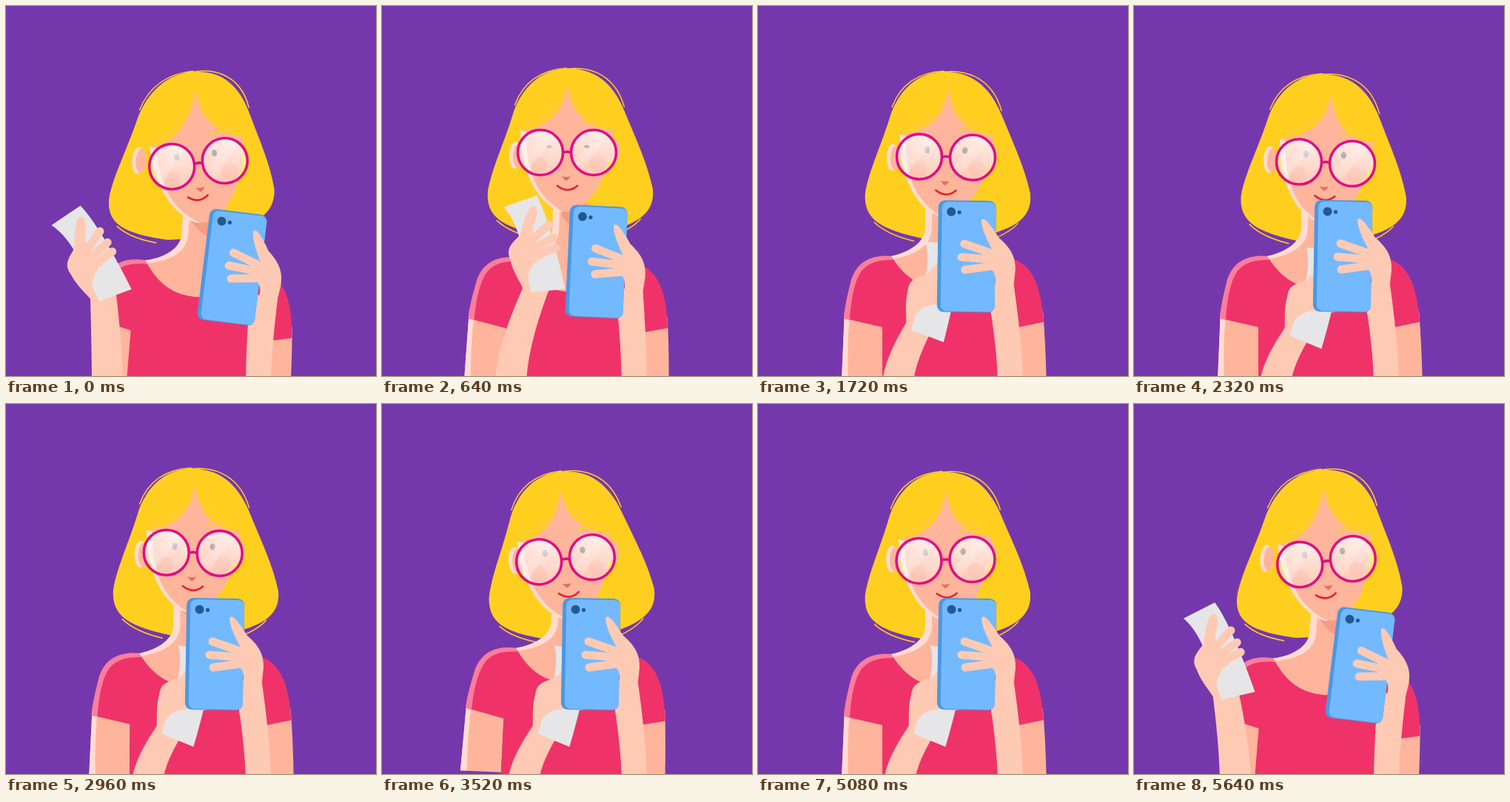
These frames come from a looping animation (500 px wide and 500 px high, 5.68 s). An HTML page:

```html
<!DOCTYPE html>
<html lang="en">
<head>
<meta charset="utf-8">
<title>Woman with phone and paper</title>
<style>
  html, body { margin: 0; width: 100%; height: 100%; overflow: hidden; background: #7538ac; }
  svg { display: block; width: 100%; height: 100%; }
  .skin { fill: #ffb59c; }
  .hand { fill: #ffcab3; }
  .light { fill: #ffdcd2; }
  .pink { fill: #ef3369; }
  .yellow { fill: #ffcf20; }
  .strand { fill: none; stroke: #ffcf20; stroke-width: 1.5; stroke-linecap: round; }
  .part { fill: none; stroke: #ffc09a; stroke-width: 1; stroke-linecap: round; }
  .finger { fill: none; stroke: #ffcab3; stroke-width: 11; stroke-linecap: round; }
  .ring { fill: none; stroke: #e00e82; stroke-width: 3.6; }
  .blush { fill: #f08f78; fill-opacity: .35; }
</style>
</head>
<body>
<svg viewBox="0 0 500 500">
  <defs>
    <linearGradient id="glass" x1=".6" y1="0" x2=".4" y2="1">
      <stop offset="0" stop-color="#fff" stop-opacity=".76"/>
      <stop offset="1" stop-color="#fff" stop-opacity=".26"/>
    </linearGradient>
    <clipPath id="lens"><circle r="30.5"/></clipPath>
    <g id="lensShape">
      <circle r="30.5" fill="url(#glass)"/>
      <path clip-path="url(#lens)" fill="#fff" fill-opacity=".18" d="M-34 20L14-34H30L-22 30Z"/>
      <circle r="30.5" class="ring"/>
    </g>
  </defs>
  <rect width="500" height="500" fill="#7538ac"/>

  <g id="hair">
    <path class="yellow" d="M250 86C220 86 193 102 178 142C165 188 150 218 145 250C143 285 165 300 228 312H285C345 300 372 285 368 250C360 215 345 185 330 150C314 110 290 86 250 86Z"/>
    <path class="strand" d="M179 134C190 103 214 87 248 85M238 88C272 80 312 90 327 138M158 290C172 303 190 310 212 315M352 290C344 300 332 306 318 312"/>
    <ellipse class="light" cx="181" cy="202" rx="8" ry="18"/>
    <ellipse class="skin" cx="185" cy="203" rx="7" ry="16"/>
    <ellipse class="skin" cx="315" cy="198" rx="7" ry="16"/>
  </g>

  <g id="body">
    <g id="upperArm">
      <path class="skin" d="M117 412L168 426V507H113Z"/>
      <path class="light" d="M117 412L124 416Q120 460 122 507H113Z"/>
    </g>
    <path class="skin" d="M343 418L385 412Q389 460 390 520H343Z"/>
    <path class="pink" d="M180 338C152 336 132 346 125 374C119 398 117 410 116 422L168 434V520H343V436L386 427C383 385 374 352 345 342Q330 338 310 334C300 366 280 382 250 382C215 381 195 362 180 338Z"/>
    <path fill="#f97d9d" d="M180 338C152 336 132 346 125 374C119 398 117 410 116 422L124 424C126 396 130 372 140 358C150 346 164 343 183 343Z"/>
    <path class="skin" d="M226 262V302C224 322 200 334 180 338C195 362 215 381 250 382C280 382 300 366 310 334L274 318V262Z"/>
    <path class="light" d="M226 262V302C224 322 200 334 180 338L183 342C212 336 234 326 235 300V262Z"/>
    <path fill="#f39c86" d="M238 280Q252 299 274 304V262H238Z"/>
  </g>

  <path id="faceSkin" class="skin"/>
  <path id="partLines" class="part"/>
  <g id="face">
    <path class="light" d="M-63-30C-62 50-20 80-6 80C-38 60-55 32-55-28Z"/>
    <path class="strand" style="stroke-width:2.4" d="M20-39Q38-43 56-36"/>
    <circle class="blush" cx="-37" cy="17" r="11"/>
    <circle class="blush" cx="41" cy="15" r="11"/>
    <ellipse class="eye" cx="-24" cy="-8" rx="3.4" fill="#6d7280"/>
    <ellipse class="eye" cx="27" cy="-8" rx="3.6" fill="#4f4648"/>
    <path d="M-7 32Q-1 34 5 32Q1 38-1 38Q-3 38-7 32Z" fill="#e0705f"/>
    <path id="mouth" d="M-13 45Q1 56 14 45" fill="none" stroke="#e8202c" stroke-width="2.6" stroke-linecap="round"/>
    <use href="#lensShape" x="-36"/>
    <use href="#lensShape" x="36"/>
    <path class="ring" d="M-5.5 0Q0-2 5.5 0"/>
  </g>

  <path id="leftArm" class="hand"/>
  <g id="leftHand">
    <path class="hand" d="M-14-22C-30-12-40-8-38 8C-38 28-32 40-30 52L4 62L8-5Z"/>
    <path fill="#e6e6e8" d="M-30-62L17-67Q27-32 25 65L-21 59C-20 20-12-30-30-62Z"/>
    <path class="hand" d="M-34-4C-20-16-10-20 0-20L6 18Q-10 18-22 40Z"/>
    <path class="hand" d="M-30 0C-14-22-4-50 8-54C18-54 12-38 2-26L-4 4Z"/>
    <path class="finger" d="M-12-6L24-24M-12 4L26-6M-8 12L26 8"/>
  </g>

  <path id="rightArm" class="hand"/>
  <g id="phone">
    <rect x="-39" y="-76" width="78" height="151" rx="9" fill="#4b98e2"/>
    <rect x="-34" y="-74" width="73" height="148" rx="8" fill="#73b9ff"/>
    <circle cx="-21.5" cy="-60.5" r="6" fill="#235891"/>
    <circle cx="-10.5" cy="-60" r="2.6" fill="#235891"/>
  </g>
  <g id="rightHand">
    <path class="hand" d="M-20-48C-16-54-6-40 4-24C18-12 27 0 26 20L23 46L-1 62V30Q-2 20-10 16L-5-8C-12-20-20-38-20-48Z"/>
    <path class="finger" d="M6 1L-43-16M4 6L-47 2M2 13L-42 19"/>
  </g>
</svg>
<script>
const LOOP = 5680, STEP = 40;
const $ = id => document.getElementById(id);

// Smooth 0 to 1 between two times.
function ramp(t, from, to) {
  const p = Math.min(1, Math.max(0, (t - from) / (to - from)));
  return p * p * (3 - 2 * p);
}

// The few actions that drive every part.
function actions(t) {
  const pulse = (a, b, c, d) => ramp(t, a, b) - ramp(t, c, d);
  const away = (backBy, from, to) => 1 - ramp(t, 0, backBy) + ramp(t, from, to);
  const lean = away(1100, 5160, 5640);
  const up = pulse(0, 600, 1300, 2200) + pulse(2360, 2720, 2760, 3400);
  const right = pulse(1300, 2200, 2600, 3300);
  const left = pulse(2800, 3500, 3600, 4400);
  return {
    base: 1, lean, up, left,
    tilt: lean * (1 - up),
    turn: right - left,
    reach: away(600, 5240, 5640),
    flick: away(1250, 5560, LOOP),
    tuck: pulse(1300, 1840, 5100, 5400),
    blink: pulse(520, 640, 640, 760)
  };
}

// Rest pose of each part and what every action adds to it.
const parts = {
  hair: { // x, y, slope, lean
    base: [0, 6, -.02, -.005], up: [0, -6, .02, .005],
    turn: [2, .5, .035, -.038], lean: [-2.5, -3, -.03, -.055]
  },
  parting: { base: [254, 120], up: [-4, -12], turn: [12, 2], tilt: [2, -5] },
  face: { // x, y, angle
    base: [253.5, 211, -1.5], up: [-3.5, -13, 1.5], turn: [5.5, .8, 3.5], tilt: [6.5, 2, -4.8]
  },
  gaze: { base: [-3, -3], up: [3, 3], tilt: [-1, -1] },
  body: { base: [0, 0, 0], left: [-2, -5, 2.8], lean: [3, 11, 4.6] },
  phone: { base: [280, 341.5, 0], tuck: [2, -3, 1], lean: [25.5, 12, 7] },
  rightHand: { base: [320, 340, 0], tuck: [2, -3, 0], lean: [28, 14.5, 7] },
  leftHand: { // x, y, angle, elbow
    base: [208, 325, 0, 174], tuck: [38, 69, 15, 17],
    reach: [-91, 12, 0, -37], flick: [0, 0, -28, 0]
  }
};

function mix(part, act) {
  return part.base.map((_, i) =>
    Object.keys(part).reduce((sum, name) => sum + part[name][i] * act[name], 0));
}

function place([x, y, angle], px, py) {
  const r = angle * Math.PI / 180, c = Math.cos(r), s = Math.sin(r);
  return [x + px * c - py * s, y + px * s + py * c];
}

const set = (id, name, value) => $(id).setAttribute(name, value);
const move = (id, x, y) => set(id, 'transform', `translate(${x} ${y})`);

function forearm(id, a, b, ax, bx) {
  const floor = 515;
  const along = ([x, y], ex, k) => [x + (ex - x) * Math.min(1, k * 1.6), y + (floor - y) * k];
  set(id, 'd', `M${a}C${along(a, ax, .35)} ${along(a, ax, .7)} ${ax} ${floor}H${bx}` +
    `C${along(b, bx, .7)} ${along(b, bx, .35)} ${b}Z`);
}

function drawFace(face, [x, y]) {
  const at = (px, py) => place(face, px, py);
  const [lx, ly] = at(-63, -30), [rx, ry] = at(63, -30);
  set('faceSkin', 'd',
    `M${x} ${y}C${x + 4} ${y + 34} ${rx - 36} ${ry - 3} ${rx} ${ry}` +
    `C${at(59, 48)} ${at(18, 80)} ${at(0, 80)}` +
    `C${at(-20, 80)} ${at(-62, 50)} ${lx} ${ly}` +
    `C${lx + 36} ${ly - 3} ${x - 4} ${y + 34} ${x} ${y}Z`);
  set('partLines', 'd',
    `M${x} ${y}C${x - 5} ${y + 26} ${lx + 34} ${ly - 14} ${lx + 8} ${ly - 8}` +
    `M${x} ${y}C${x + 5} ${y + 26} ${rx - 34} ${ry - 14} ${rx - 10} ${ry - 8}`);
}

function draw(t) {
  const act = actions(t), now = {};
  for (const name in parts) now[name] = mix(parts[name], act);

  const [hx, hy, slope, lean] = now.hair;
  set('hair', 'transform',
    `matrix(1 ${slope} ${lean} 1 ${hx - 200 * lean} ${hy - 250 * slope})`);
  const [bx, by, angle] = now.body;
  set('body', 'transform', `translate(${bx} ${by}) rotate(${angle} 250 400)`);
  move('upperArm', 16 * act.reach, 0);

  drawFace(now.face, now.parting);
  move('mouth', -6 * act.tilt, -1.5 * act.tilt);
  for (const eye of document.querySelectorAll('.eye')) {
    eye.setAttribute('transform', `translate(${now.gaze})`);
    eye.setAttribute('ry', 4.6 - 2.6 * act.blink);
  }
  for (const id of ['face', 'phone', 'rightHand', 'leftHand']) {
    const [x, y, turn] = now[id];
    set(id, 'transform', `translate(${x} ${y}) rotate(${turn})`);
  }

  const left = now.leftHand, right = now.rightHand;
  forearm('leftArm', place(left, -30, 50), place(left, 4, 60), left[3] - 21, left[3] + 21);
  forearm('rightArm', place(right, 24, 40), place(right, -14, 35), 358, 324);
}

const start = performance.now();
function tick() {
  const t = (performance.now() - start) % LOOP;
  draw(Math.floor(t / STEP) * STEP);
  requestAnimationFrame(tick);
}
tick();
</script>
</body>
</html>
```
